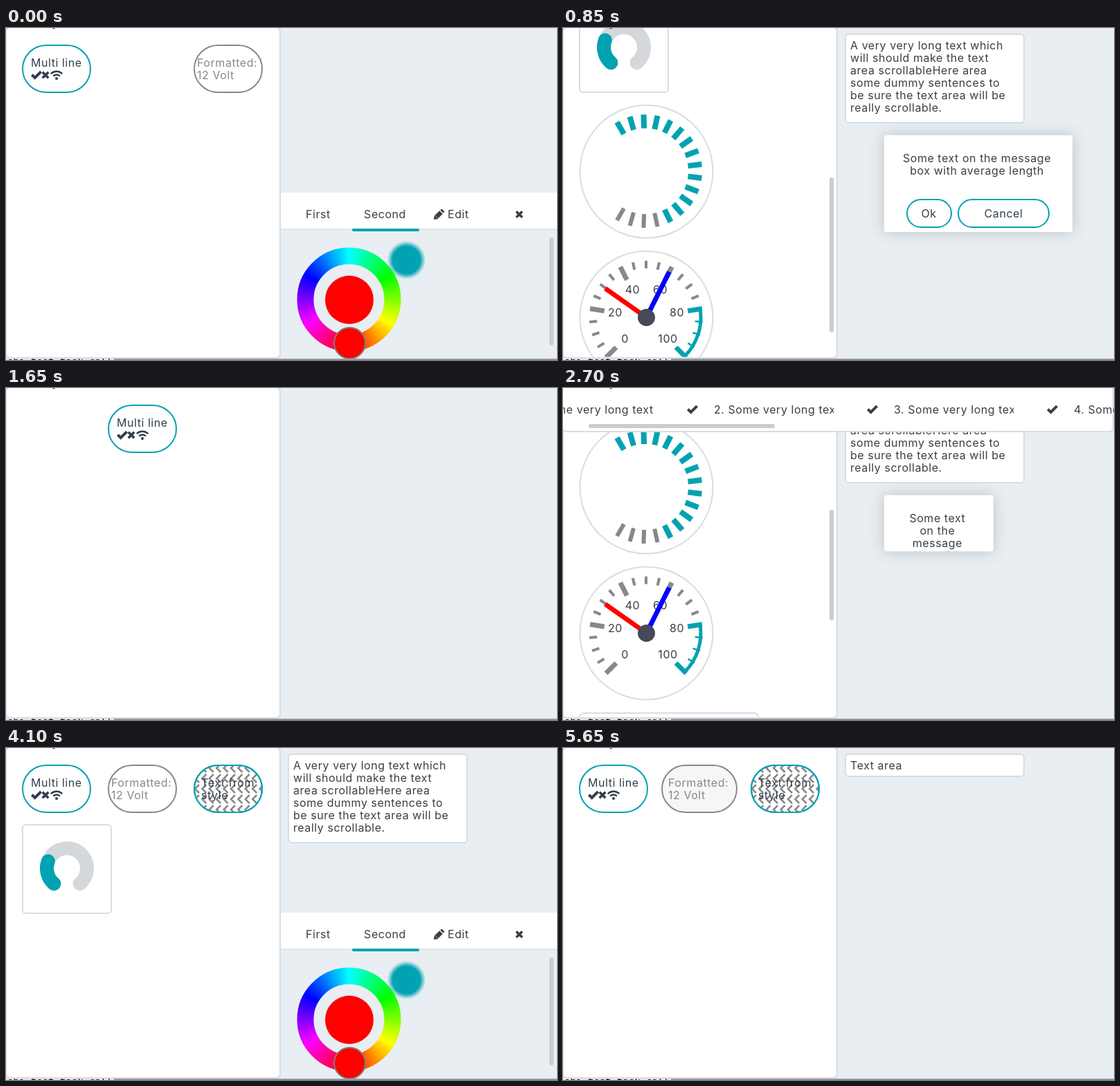
An HTML page with a canvas for the animation above (5700 ms loop, 796 px wide and 480 px high).

```html
<!DOCTYPE html>
<html lang="en">
<head>
<meta charset="utf-8">
<title>Widget stress demo</title>
<style>
  html, body { margin: 0; width: 100%; height: 100%; overflow: hidden; background: #e9eef2; }
  canvas { display: block; }
</style>
</head>
<body>
<canvas id="stage" width="796" height="480"></canvas>
<script>
const ctx = document.getElementById('stage').getContext('2d');
const TEAL = '#01a2b1', GRAY = '#888888', EDGE = '#d6dde3', INK = '#3b3e42', NAVY = '#2f3d4d', BG = '#e9eef2';
const LOOP = 5700, STEP = 50, RAD = Math.PI / 180;
const LONG_TEXT = ['A very very long text which', 'will should make the text', 'area scrollableHere area',
  'some dummy sentences to', 'be sure the text area will be', 'really scrollable.'];
const MESSAGE = 'Some text on the message box with average length';

// Scenes: start time and settings; a [from, to] pair moves during the scene.
const single = { buttons: 1 };
const gauges = { area: 2, rows: 4, scroll: 146, msg: 1, thumbY: 216, thumbH: 224 };
const narrow = { ...gauges, scroll: 210, msg: .58, bar: 0, thumbY: 176, thumbH: 160 };
const ending = { area: 3, rows: 4, scroll: 724, thumbY: 247, thumbH: 225 };
const scenes = [
  [0, { buttons: 2, tabs: 1 }],
  [50, { buttons: 3, tabs: 1 }],
  [100, { buttons: 3, tabs: 1, area: 1 }],
  [150, { buttons: 3, tabs: 1, area: 1, wide: 1 }],
  [300, { buttons: 3, wide: 1, area: 2, rows: 3, scroll: [0, 90] }],
  [550, { ...gauges, buttons: 3, wide: 1, scroll: [90, 146], msg: [.2, 1] }],
  [850, gauges],
  [900, { ...narrow, scroll: [146, 210], msg: [1, .58], thumbY: [216, 176], thumbH: [224, 160] }],
  [1050, { ...narrow, scroll: [210, 724], msg: [.58, .257], bar: [0, 128], thumbY: [176, 247], thumbH: [160, 225] }],
  [1300, ending],
  [1650, single],
  [1800, { buttons: 3, area: 1, tabs: 1 }],
  [1950, { buttons: 3, area: 2, tabs: 1, wide: 1, rows: 1 }],
  [2350, gauges],
  [2700, narrow],
  [2800, { ...ending, area: 2, msg: .4, bar: 64 }],
  [3100, ending],
  [3500, single],
  [3850, { buttons: 3, area: 2, rows: 1 }],
  [4100, { buttons: 3, area: 2, rows: 1, tabs: 1 }],
  [4250, gauges],
  [4500, { ...ending, msg: .257, bar: 128 }],
  [5100, single],
  [5650, { buttons: 3, wide: 1, area: 1 }]
];

function stateAt(time) {
  const t = Math.floor(time / STEP) * STEP;
  const i = scenes.findLastIndex(s => s[0] <= t);
  const [start, scene] = scenes[i];
  const u = (t - start) / ((scenes[i + 1]?.[0] ?? LOOP) - start);
  const state = { buttons: 0, area: 0, rows: 0, scroll: 0, msg: 0 };
  for (const [key, v] of Object.entries(scene)) {
    state[key] = Array.isArray(v) ? v[0] + (v[1] - v[0]) * u : v;
  }
  return state;
}

function useTextFont() {
  ctx.font = '400 16px Inter, sans-serif';
  ctx.letterSpacing = '0.55px';
}

function text(str, x, y, color = INK, align = 'left') {
  useTextFont();
  ctx.textAlign = align;
  ctx.fillStyle = color;
  ctx.fillText(str, x, y);
}

function box(x, y, w, h, r, fill, stroke) {
  const d = stroke ? 1 : 0;
  ctx.beginPath();
  ctx.roundRect(x + d, y + d, w - 2 * d, h - 2 * d, r);
  if (fill) { ctx.fillStyle = fill; ctx.fill(); }
  if (stroke) { ctx.strokeStyle = stroke; ctx.lineWidth = 2; ctx.stroke(); }
}

function disc(x, y, r, fill, stroke) {
  box(x - r, y - r, 2 * r, 2 * r, r, fill, stroke);
}

function line(points, width, color) {
  ctx.beginPath();
  points.forEach(([x, y]) => ctx.lineTo(x, y));
  ctx.lineWidth = width;
  ctx.strokeStyle = color;
  ctx.stroke();
}

function arc(x, y, r, from, to, width, color, cap = 'butt') {
  ctx.beginPath();
  ctx.arc(x, y, r, from * RAD, to * RAD);
  ctx.lineWidth = width;
  ctx.strokeStyle = color;
  ctx.lineCap = cap;
  ctx.stroke();
  ctx.lineCap = 'butt';
}

function tick(x, y, angle, inner, outer, width, color) {
  const c = Math.cos(angle * RAD), s = Math.sin(angle * RAD);
  line([[x + c * inner, y + s * inner], [x + c * outer, y + s * outer]], width, color);
}

function clipped(x, y, w, h, draw) {
  ctx.save();
  ctx.beginPath();
  ctx.rect(x, y, w, h);
  ctx.clip();
  draw();
  ctx.restore();
}

function check(x, y, color = INK) {
  line([[x + 1.4, y - .3], [x + 5.7, y + 4], [x + 14.6, y - 4.9]], 4, color);
}

function cross(x, y, color = INK) {
  for (const d of [-4.3, 4.3]) line([[x - 4.3, y - d], [x + 4.3, y + d]], 3.5, color);
}

function capsule(x, y, w, h, color = TEAL, fill = '#fff') {
  box(x, y, w, h, h / 2, fill, color);
}

function multiLineButton(x, y) {
  capsule(x, y, 100, 70);
  text('Multi line', x + 13, y + 32, NAVY);
  check(x + 13, y + 44, NAVY);
  cross(x + 34, y + 44, NAVY);
  disc(x + 50, y + 49, 2, NAVY);
  arc(x + 50, y + 50, 6.5, -137, -43, 2.4, NAVY);
  arc(x + 50, y + 50, 11.3, -137, -43, 2.4, NAVY);
}

function formattedButton(center, y, w) {
  capsule(center - w / 2, y, w, 70, GRAY, w > 100 ? '#f6f6f6' : '#fff');
  text('Formatted:', center - 45, y + 32, GRAY);
  text('12 Volt', center - 45, y + 50, GRAY);
}

function patternButton(x, y) {
  capsule(x, y, 100, 70);
  ctx.save();
  ctx.clip();
  for (let row = 0; row < 5; row++) {
    for (let col = 0; col < 10; col++) {
      const px = x + 1 + col * 10.4, py = y + 5 + row * 15;
      line([[px + 7, py - 6], [px + 1, py], [px + 7, py + 6]], 2.5, GRAY);
    }
  }
  ctx.restore();
  capsule(x, y, 100, 70, TEAL, null);
  text('Text from', x + 11, y + 32, NAVY);
  text('style', x + 11, y + 50, NAVY);
}

function arcCard(y) {
  box(23, y, 130, 130, 5, '#fff', EDGE);
  arc(88, y + 64, 29, 130, 410, 20, '#d5d8db', 'round');
  arc(88, y + 64, 29, 130, 201, 20, TEAL, 'round');
}

function lineMeter(y) {
  disc(120.5, y, 97, '#fff', EDGE);
  for (let i = 0; i < 18; i++) {
    const on = i < 14;
    tick(119, y - .5, -120 + i * 240 / 17, 62, 82, on ? 8 : 6, on ? TEAL : GRAY);
  }
}

function gauge(y) {
  const x = 120.5;
  disc(x, y, 97, '#fff', EDGE);
  for (let i = 0; i <= 20; i++) {
    const major = i % 4 === 0, critical = i >= 16;
    tick(x - .5, y, 135 + i * 13.5, major ? 61 : 71, 82, major ? 7 : critical ? 2.5 : 4, critical ? TEAL : GRAY);
  }
  arc(x - .5, y, 79, -9, 45, 5, TEAL);
  [[-31, 31], [-45, -7], [-20, -40], [20, -40], [44, -7], [31, 31]].forEach(([dx, dy], i) =>
    text(String(i * 20), x + dx, y + dy + 5.5, INK, 'center'));
  line([[x, y], [x - 59.5, y - 42]], 7, '#f00');
  line([[x, y], [x + 33, y - 66]], 7, '#00f');
  disc(x, y, 12.5, '#45495a');
}

function listItem(n, x, y, shift) {
  check(x - 39, y, INK);
  clipped(x, y - 15, 173, 30, () => text(n + '. Some very long text', x - shift, y + 6));
}

function verticalList(y) {
  box(23, y, 260, 481, 6, '#fff', EDGE);
  [1, 2, 3, 5].forEach((n, i) => {
    const cy = y + 58 + i * 66;
    listItem(n, 86, cy, 2);
    ctx.fillStyle = '#dadcde';
    ctx.fillRect(47, cy + 32, 212, 1);
  });
}

function leftPage(s) {
  box(-1, -2, 398, 480, 6, '#fff', EDGE);
  clipped(0, 0, 395, 475.5, () => {
    const y = 24 - s.scroll;
    if (s.buttons) multiLineButton(s.buttons === 1 ? 147 : 23, y);
    if (s.buttons === 2) formattedButton(321, y, 100);
    if (s.buttons === 3) {
      formattedButton(197, y, s.wide ? 110 : 100);
      patternButton(271, y);
    }
    [[arcCard, 110], [lineMeter, 353.5], [gauge, 564.5], [verticalList, 679]]
      .slice(0, s.rows).forEach(([draw, top]) => draw(top - s.scroll));
    if (s.thumbH) box(385, s.thumbY, 6, s.thumbH, 3, '#cccccc');
  });
}

function textArea(kind) {
  box(407, 8, 260, kind === 1 ? 34 : 130, 5, '#fff', EDGE);
  const lines = [[], ['Text area'], LONG_TEXT, []][kind];
  lines.forEach((str, i) => text(str, 415, 31 + i * 18));
}

function wrap(str, width) {
  const lines = [''];
  useTextFont();
  for (const word of str.split(' ')) {
    const last = lines.at(-1), longer = last ? last + ' ' + word : word;
    if (!last || ctx.measureText(longer).width <= width) lines[lines.length - 1] = longer;
    else lines.push(word);
  }
  return width < 40 ? [str.slice(0, 2)] : lines;
}

function messageBox(scale) {
  const x = 464, y = 155, w = 272 * scale, h = 140 * scale;
  ctx.save();
  ctx.shadowColor = 'rgba(60, 70, 80, .28)';
  ctx.shadowBlur = 22;
  box(x, y, w, h, 4, '#fff');
  ctx.restore();
  clipped(x, y, w, h, () => {
    wrap(MESSAGE, w - 56).forEach((str, i) => text(str, x + w / 2 - 2, y + 39 + i * 18, INK, 'center'));
    if (scale < 1) return;
    capsule(496, 247, 66, 42);
    capsule(570, 247, 133, 42);
    text('Ok', 528.5, 274, NAVY, 'center');
    text('Cancel', 636.5, 274, NAVY, 'center');
  });
}

function pencil(x, y) {
  line([[x + 4, y + 12], [x + 10.5, y + 5.5]], 6.5, INK);
  line([[x + 11.5, y + 4.5], [x + 13.5, y + 2.5]], 6, INK);
  ctx.beginPath();
  [[0, 16], [1, 9.5], [6.5, 15]].forEach(([dx, dy]) => ctx.lineTo(x + dx, y + dy));
  ctx.fillStyle = INK;
  ctx.fill();
}

function tabView() {
  ctx.fillStyle = '#fff';
  ctx.fillRect(397, 238, 399, 52);
  ctx.fillStyle = '#e1e7ec';
  ctx.fillRect(397, 290, 399, 2);
  text('First', 451, 275, INK, 'center');
  text('Second', 547.5, 275, INK, 'center');
  pencil(618, 261);
  text('Edit', 638, 275);
  cross(741.5, 269.5);
  box(500, 290, 97, 4, 2, TEAL);
  box(785, 303, 6, 156, 3, '#cccdcf');

  const hues = ctx.createConicGradient(Math.PI / 2, 495.5, 392.5);
  for (let i = 0; i <= 6; i++) hues.addColorStop(i / 6, `hsl(${360 - i * 60}, 100%, 50%)`);
  arc(495.5, 392.5, 63, 0, 360, 24, hues);
  disc(496, 393, 35, '#f00');
  clipped(397, 238, 399, 240, () => disc(496.5, 455.5, 23.5, '#f00', '#808080'));

  const glow = ctx.createRadialGradient(578.5, 335.5, 0, 578.5, 335.5, 28);
  [[0, 1], [.71, 1], [.78, .75], [.9, .3], [1, 0]].forEach(([at, alpha]) =>
    glow.addColorStop(at, `rgba(1, 162, 177, ${alpha})`));
  disc(578.5, 335.5, 28, glow);
}

function listBar(scroll) {
  box(-2, -4, 798, 68, 6, '#fff', EDGE);
  for (let n = 1; n <= 5; n++) {
    listItem(n, 218 + (n - 2) * 260 - scroll, 31, n === 1 ? 6 : scroll / 43);
  }
  box(37 + scroll * 43 / 128, 52, 269, 6, 3, '#cccccc');
}

// Slivers of the console window behind the stage.
function consoleEdge() {
  ctx.fillStyle = '#99999f';
  ctx.fillRect(0, 478, 796, 2);
  clipped(0, 478, 156, 2, () => {
    ctx.fillStyle = '#e4e6e9';
    ctx.fillRect(0, 478, 156, 2);
    ctx.font = '14px "DejaVu Sans Mono", monospace';
    ctx.letterSpacing = '0px';
    ctx.textAlign = 'left';
    ctx.fillStyle = '#111';
    ctx.fillText('obj_test_task_call', 2, 487);
  });
  ctx.fillStyle = '#555';
  ctx.fillRect(67, 0, 4, 1);
}

function draw(s) {
  ctx.fillStyle = BG;
  ctx.fillRect(0, 0, 796, 480);
  leftPage(s);
  if (s.area) textArea(s.area);
  if (s.tabs) tabView();
  if (s.msg) messageBox(s.msg);
  if (s.bar !== undefined) listBar(s.bar);
  consoleEdge();
}

function frame() {
  draw(stateAt(performance.now() % LOOP));
  requestAnimationFrame(frame);
}
frame();
</script>
</body>
</html>
```
